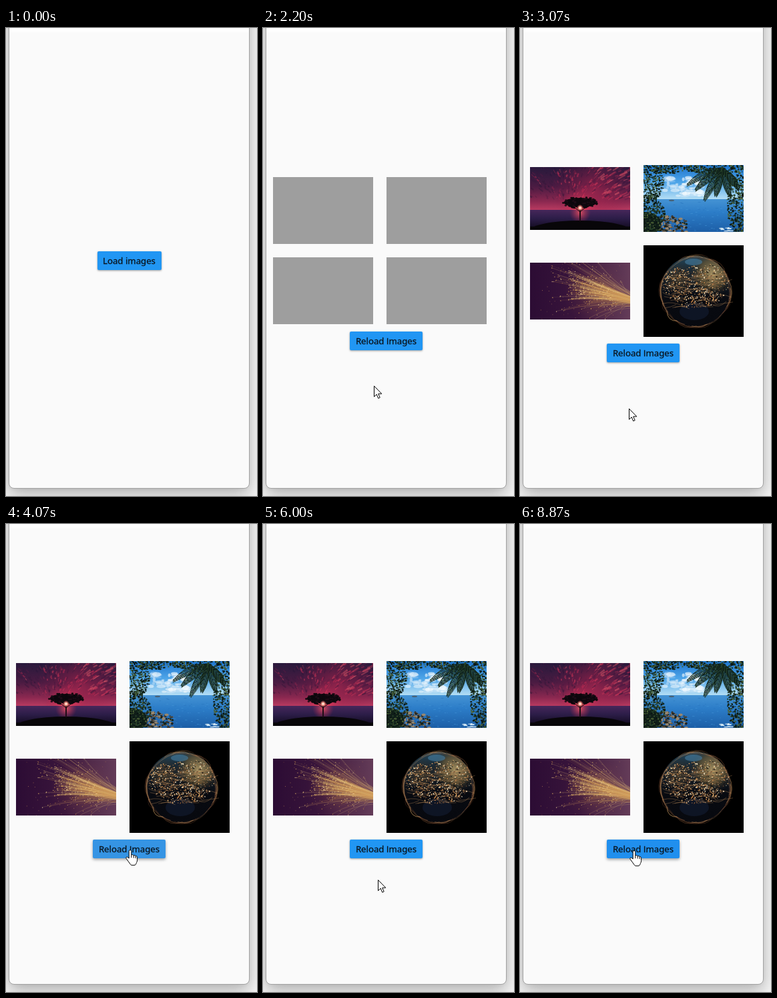
Recreate the animation shown at these times as an HTML page with a canvas. Size 376 by 700 pixels, loop 8940 ms.

```html
<!DOCTYPE html>
<html lang="en">
<head>
<meta charset="utf-8">
<title>Load images</title>
<style>
html, body { margin: 0; width: 100%; height: 100%; overflow: hidden; background: #f6f6f6; }
#stage { position: relative; width: 376px; height: 700px; overflow: hidden; }
#stage > * { position: absolute; }
#win {
  left: 4px; top: -40px; width: 359px; height: 727px;
  border: 1px solid #a2a2a2; border-radius: 8px; background: #fafafa;
  box-shadow: 0 10px 26px rgba(0,0,0,.28), 0 0 6px rgba(0,0,0,.05);
}
#bar { left: 5px; top: 0; width: 359px; height: 7px; background: linear-gradient(#fefefe 5px, #fafafa); }
#btn {
  box-sizing: border-box; height: 28px; border-radius: 2px; text-align: center;
  font: 500 13.2px/29px "Noto Sans", "Open Sans", sans-serif; color: #0a1620; white-space: nowrap;
  -webkit-text-stroke: .3px #0a1620;
}
#btn i { font-family: "Open Sans", sans-serif; font-style: normal; }
.slot { background: #9e9e9e; }
#cur { left: 0; top: 0; overflow: visible; }
#cur path { fill: #fff; stroke: #000; stroke-width: 1; stroke-linejoin: round; }
#cur path.line { fill: none; }
</style>
</head>
<body>
<div id="stage">
  <div id="win"></div>
  <div id="bar"></div>
  <div id="btn"></div>
  <svg id="cur" width="24" height="26">
    <path id="arrow" d="M.5 .5v16l3.7-3.5 2.5 5.9 2.5-1.1-2.5-5.7h5.1z"/>
    <g id="hand" transform="translate(-7 0)">
      <path d="M5.2 13V2.400a1.800 1.800 0 0 1 3.600 0v5.800c.6-.9 3.200-.8 3.400.7.8-.7 2.800-.5 3 .9.9-.5 2.400 0 2.400 1.500v4.200c0 2.400-1 3.600-1.600 5.200-.5 1.800-1.400 2.600-3 2.600h-3c-1.500 0-2.400-.5-3.200-2C5.200 18.500 2.500 15.700 1 13.200c-.9-1.700 1.200-2.800 2.500-1.600z"/>
      <path class="line" d="M8.800 8.200v4M12.200 9v3.500M15.200 10v3"/>
    </g>
  </svg>
</div>
<script>
const LOOP = 8940, STEP = 1000 / 15;
const HOVER_AT = 1330, GRID_AT = 1660, PHOTOS_AT = 2260, COAST_AT = 2660;
const TAU = Math.PI * 2;
const $ = id => document.getElementById(id);
const stage = $('stage'), btn = $('btn'), cur = $('cur');

function random(seed) {
  return () => (seed = (seed * 16807) % 2147483647) / 2147483647;
}
function fade(c, x0, y0, x1, y1, ...stops) {
  const g = c.createLinearGradient(x0, y0, x1, y1);
  stops.forEach(([p, col]) => g.addColorStop(p, col));
  return g;
}
function glow(c, x, y, r, ...stops) {
  const g = c.createRadialGradient(x, y, 0, x, y, r);
  stops.forEach(([p, col]) => g.addColorStop(p, col));
  c.fillStyle = g;
  c.fillRect(x - r, y - r, 2 * r, 2 * r);
}
function oval(c, x, y, rx, ry, col) {
  c.fillStyle = col;
  c.beginPath();
  c.ellipse(x, y, rx, ry, 0, 0, TAU);
  c.fill();
}
function curve(c, x0, y0, cx, cy, x1, y1, col, w) {
  c.strokeStyle = col;
  c.lineWidth = w;
  c.beginPath();
  c.moveTo(x0, y0);
  c.quadraticCurveTo(cx, cy, x1, y1);
  c.stroke();
}
const pick = (list, r) => list[Math.floor(r() * list.length)];

function sunset(c, w, h) {
  const r = random(41);
  c.fillStyle = fade(c, 0, 0, 0, 64, [0, '#281a3c'], [.45, '#4a1b42'], [.8, '#8a2850'], [1, '#b83a60']);
  c.fillRect(0, 0, w, 64);
  glow(c, 95, 34, 62, [0, 'rgba(190,40,80,.55)'], [1, 'rgba(120,20,60,0)']);
  // soft wisps that lean away from the sun
  for (let i = 0; i < 300; i++) {
    const x = r() * w, y = r() * 50, lean = (x - 75) / 75, len = 3 + r() * 9;
    const lit = r() < .3 + .3 * (x > 55) - .25 * (x < 35);
    c.globalAlpha = .2 + r() * .35;
    curve(c, x, y, x + lean * len * .6 + r() * 4 - 2, y - len * .2,
      x + lean * len + 2, y - len * .5,
      pick(lit ? ['#e03a5c', '#c82c54', '#f0606e'] : ['#38183e', '#241434', '#5a1c44'], r), .8 + r() * 1.8);
  }
  c.globalAlpha = 1;
  glow(c, 75, 61, 30, [0, '#ff6a70'], [.35, 'rgba(235,60,90,.5)'], [1, 'rgba(200,40,80,0)']);
  c.fillStyle = fade(c, 0, 64, 0, 90, [0, '#46275a'], [.5, '#2c1d48'], [1, '#150d24']);
  c.fillRect(0, 64, w, 30);
  glow(c, 75, 68, 16, [0, 'rgba(255,90,100,.8)'], [1, 'rgba(200,40,80,0)']);
  oval(c, 75, 97, 78, 17, '#080609');
  c.fillRect(0, 89, w, 5);
  oval(c, 75, 53, 24, 7, '#0d080d');
  for (let i = 0; i < 150; i++) {
    const a = r() * TAU, d = Math.sqrt(r());
    oval(c, 75 + Math.cos(a) * d * 26, 53 + Math.sin(a) * d * 8.5, 1.7, 1.3, pick(['#0d080d', '#0d080d', '#1d0c16'], r));
  }
  c.fillRect(74, 56, 2, 25);
  for (const dx of [-16, -9, 9, 16]) curve(c, 75, 67, 75 + dx * .4, 61, 75 + dx, 56, '#0d080d', 1);
  glow(c, 75, 61, 5, [0, '#fff'], [.35, '#ffb9a0'], [1, 'rgba(255,80,90,0)']);
}

function leaves(c, r, n, x, y, rx, ry) {
  for (let i = 0; i < n; i++) {
    const a = r() * TAU, d = Math.sqrt(r());
    oval(c, x + Math.cos(a) * d * rx, y + Math.sin(a) * d * ry, .7 + r() * 1.1, .6 + r() * .9,
      pick(['#0e1d18', '#15291e', '#0a1514', '#24402a', '#4c6236'], r));
  }
}
function frond(c, x, y, a, len) {
  for (let i = 0; i < 30; i++) {
    const d = len * i / 30, px = x + Math.cos(a) * d, py = y + Math.sin(a) * d + d * d * .005;
    const l = 8 * Math.sin(Math.PI * (i + 6) / 38);
    for (const s of [-.8, .8])
      curve(c, px, py, px + Math.cos(a + s) * l * .6, py + Math.sin(a + s) * l * .6,
        px + Math.cos(a + s) * l, py + Math.sin(a + s) * l + 3, i % 4 ? '#10211a' : '#2c4a2c', 1);
  }
}
function coast(c, w, h) {
  const r = random(77);
  c.fillStyle = fade(c, 0, 0, 0, 51, [0, '#1d74cd'], [.5, '#4da4e8'], [1, '#b4def5']);
  c.fillRect(0, 0, w, 51);
  for (let i = 0; i < 60; i++) {
    c.globalAlpha = .3 + r() * .4;
    oval(c, 32 + r() * 60, 18 + r() * 28, 2 + r() * 6, 1 + r() * 2.6, '#f4fafe');
  }
  c.globalAlpha = 1;
  c.fillStyle = fade(c, 0, 51, 0, h, [0, '#4593d4'], [.4, '#2c7dc8'], [1, '#1d5ea6']);
  c.fillRect(0, 51, w, 49);
  for (let i = 0; i < 90; i++) {
    c.fillStyle = pick(['#4496d6', '#2570bb'], r);
    c.fillRect(28 + r() * 110, 54 + r() * 44, 1 + r() * 3, .5);
  }
  oval(c, 42, 53, 4, 1.2, '#49647a');
  for (let i = 0; i < 150; i++) {
    const x = 22 + r() * 43;
    oval(c, x, 76 + r() * 24 + Math.max(0, x - 45) * .4, .9 + r() * 2.2, .7 + r() * 1.2,
      pick(['#3a352e', '#6a5f50', '#988871', '#20221f', '#16241a'], r));
  }
  for (let i = 0; i < 14; i++) oval(c, 112 + r() * 22, 93 + r() * 6, 1 + r() * 3, .6, '#d9ecf6');
  oval(c, 2, 88, 24, 18, '#101e18');
  leaves(c, r, 480, 6, 24, 25, 32);
  leaves(c, r, 420, 8, 74, 24, 30);
  leaves(c, r, 130, 36, 5, 26, 8);
  leaves(c, r, 420, 142, 58, 17, 44);
  leaves(c, r, 330, 112, 5, 52, 9);
  [[2.65, 46], [2.2, 46], [1.85, 36], [1.25, 36], [2.95, 54], [.75, 34]].forEach(([a, l]) => frond(c, 118, 4, a, l));
}

function sparks(c, w, h) {
  const r = random(19);
  c.fillStyle = fade(c, 0, 0, w, 0, [0, '#2c0c34'], [.5, '#3a163c'], [1, '#643c58']);
  c.fillRect(0, 0, w, h);
  glow(c, 100, 45, 50, [0, 'rgba(180,115,65,.32)'], [1, 'rgba(120,60,70,0)']);
  for (let i = 0; i < 430; i++) {
    const wide = i % 3 === 0;
    const d = (wide ? 12 : 25) + r() * (wide ? 110 : 68);
    const off = (r() + r() - 1) * (wide ? 62 : 27) * (.4 + d / 130);
    const x = 150 - d, y = 56 - d * .25 + off;
    c.globalAlpha = .12 + r() * .38;
    curve(c, 153, 56 + off * .22, x + d * .5, 56 - d * .15 + off * .42, x, y,
      pick(['#c98e50', '#e6bd74', '#9a6444', '#f0d488'], r), .45);
    c.globalAlpha = .5 + r() * .5;
    c.fillStyle = pick(['#ffe4a0', '#e2b668', '#c88e46'], r);
    c.fillRect(x, y, 1.1, 1.1);
  }
  for (let i = 0; i < 90; i++) {
    c.globalAlpha = .3 + r() * .5;
    c.fillStyle = '#c08a58';
    c.fillRect(15 + r() * 120, r() * h, .9, .9);
  }
}

function globe(c, w, h) {
  const r = random(63), X = 78, Y = 69, R = 53;
  c.fillStyle = '#000';
  c.fillRect(0, 0, w, h);
  c.save();
  c.beginPath();
  c.arc(X, Y, R, 0, TAU);
  c.clip();
  c.fillStyle = fade(c, 0, Y - R, 0, Y + R, [0, '#27485a'], [.25, '#14212c'], [.6, '#080a10'], [1, '#07090f']);
  c.fillRect(0, 0, w, h);
  glow(c, 103, 42, 34, [0, '#a08d60'], [.6, 'rgba(95,80,50,.75)'], [1, 'rgba(40,36,30,0)']);
  glow(c, 52, 50, 26, [0, 'rgba(100,78,50,.7)'], [1, 'rgba(50,40,30,0)']);
  oval(c, 75, 25, 13, 5, 'rgba(70,125,160,.6)');
  oval(c, 76, 99, 22, 13, 'rgba(18,26,46,.7)');
  const lands = [[50, 58, 22, 24, 260], [101, 56, 28, 28, 300], [80, 78, 36, 15, 270], [64, 38, 24, 9, 60]];
  for (const [x, y, rx, ry, n] of lands)
    for (let i = 0; i < n; i++) {
      const a = r() * TAU, d = Math.sqrt(r()), s = .6 + r() * 1.1;
      c.fillStyle = pick(['#f2bc78', '#fff0cf', '#c9864a', '#6b4630', '#14100e'], r);
      c.fillRect(x + Math.cos(a) * d * rx, y + Math.sin(a) * d * ry, s, s);
    }
  c.restore();
  for (let i = 0; i < 46; i++) {
    const a = r() * TAU, b = a + .3 + r() * .8, k = 1.02 + r() * .16;
    const p = (t, m) => [X + Math.cos(t) * R * m, Y + Math.sin(t) * R * m];
    c.globalAlpha = .3 + r() * .4;
    curve(c, ...p(a, .98), ...p((a + b) / 2, k), ...p(b, .98), pick(['#b5754a', '#d9a86c', '#6b4430'], r), .6);
  }
  for (let i = 0; i < 55; i++) {
    const x = 28 + r() * 76, y = 44 + r() * 50, l = 10 + r() * 22;
    curve(c, x, y, x + l / 2, y - 10 + r() * 18, x + l, y + r() * 10 - 5, '#d9a064', .5);
  }
}

// x, empty top, loaded top, loaded height, painter, load time
const slots = [
  [15, 223, 208, 94, sunset, PHOTOS_AT],
  [185, 223, 205, 100, coast, COAST_AT],
  [15, 343, 351, 85, sparks, PHOTOS_AT],
  [185, 343, 325, 137, globe, PHOTOS_AT]
].map(([x, top0, top, h, paint, at]) => {
  const box = document.createElement('div');
  const pic = document.createElement('canvas');
  box.className = 'slot';
  pic.width = 150;
  pic.height = h;
  for (const el of [box, pic]) stage.insertBefore(el, cur);
  paint(pic.getContext('2d'), 150, h);
  box.style.cssText = `left:${x}px;width:150px;height:100px`;
  pic.style.cssText = `left:${x}px;top:${top}px`;
  return { box, pic, top0, at };
});

// time, pointer x, pointer y
const path = [
  [HOVER_AT, 209, 353], [1870, 209, 353], [2200, 166, 535], [2400, 163, 557],
  [2670, 163, 569], [3400, 163, 569], [3930, 186, 487], [4870, 186, 487],
  [5000, 184, 494], [5330, 172, 532], [7000, 171, 533], [7270, 170, 513],
  [7530, 171, 488], [LOOP, 171, 488]
];
function pointer(t) {
  const i = path.findIndex(p => p[0] > t);
  if (i < 1) return path[i < 0 ? path.length - 1 : 0].slice(1);
  const [t0, x0, y0] = path[i - 1], [t1, x1, y1] = path[i];
  const k = (t - t0) / (t1 - t0);
  return [Math.round(x0 + (x1 - x0) * k), Math.round(y0 + (y1 - y0) * k)];
}

const show = (el, on) => { el.style.display = on ? 'block' : 'none'; };
let label = '';

function render(t) {
  const grid = t >= GRID_AT, photos = t >= PHOTOS_AT, active = t >= HOVER_AT;
  const [x, y] = pointer(t);
  const top = photos ? 472 : grid ? 454 : 334;
  const left = grid ? 130 : 136.5, width = grid ? 109 : 96;
  const over = active && (t < 1880 || (x > left && x < left + width && y >= top && y < top + 28));

  const text = grid ? 'Reload <i>I</i>mages' : 'Load images';
  if (text !== label) btn.innerHTML = label = text;
  const tint = t < 2000 ? '#3d9be9' : t < 6000 ? '#3594e4' : '#208fee';
  Object.assign(btn.style, {
    left: left + 'px', top: top + 'px', width: width + 'px',
    background: over ? tint : '#2196f3',
    boxShadow: over ? '0 2px 4px rgba(0,0,0,.36)' : '0 1px 3px rgba(0,0,0,.38)'
  });

  for (const s of slots) {
    show(s.box, grid && t < s.at);
    show(s.pic, t >= s.at);
    s.box.style.top = (photos ? 205 : s.top0) + 'px';
  }
  show(cur, active);
  show($('hand'), over);
  show($('arrow'), !over);
  cur.style.transform = `translate(${x}px,${y}px)`;
}

const start = performance.now();
function tick() {
  const t = (performance.now() - start) % LOOP;
  render(Math.floor(t / STEP + .06) * STEP);
  requestAnimationFrame(tick);
}
tick();
</script>
</body>
</html>
```
